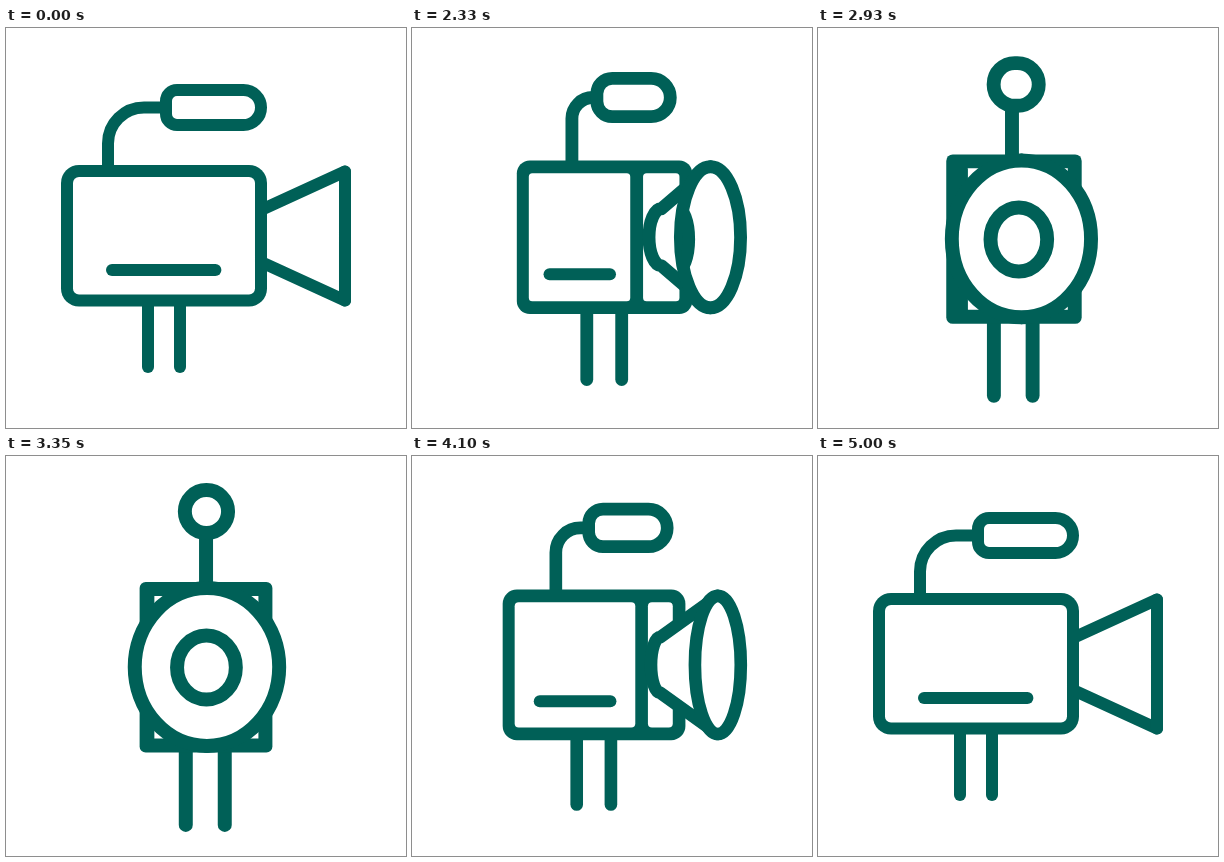
Write an HTML page with a canvas that moves like this. It is 400 by 400 pixels and loops after 5.03 s.

```html
<!DOCTYPE html>
<html lang="en">
<head>
<meta charset="utf-8">
<title>Turning camera</title>
<style>
html, body { margin: 0; width: 100%; height: 100%; overflow: hidden; background: #fff; }
canvas { display: block; width: 400px; height: 400px; }
</style>
</head>
<body>
<canvas id="stage" width="400" height="400"></canvas>
<script>
const ctx = document.getElementById('stage').getContext('2d');
const INK = '#006057', PAPER = '#fff';
const LOOP = 5030, START = 2030, STEP = 30;

const clamp = v => Math.min(1, Math.max(0, v));

// Damped approach to the front view, then a smooth return: 0 is side, 1 is front
function turn(t) {
  const y = Math.max(0, t - 2000) * .0071;
  const there = 1 - (1 + y + y * y / 2) * Math.exp(-y);
  const u = clamp((t - 3550) / 880);
  return there * (1 - u * u * (3 - 2 * u));
}

// One swing to the right with a small rebound to the left
function swing(t, begin, length) {
  const u = clamp((t - begin) / length);
  return 850 * u ** 1.5 * (1 - u) ** 2.5 * (.578 - u);
}

const sway = t => swing(t, 2000, 1400) + swing(t, 3500, 1500);

function line(x0, y0, x1, y1) {
  ctx.beginPath();
  ctx.moveTo(x0, y0);
  ctx.lineTo(x1, y1);
  ctx.stroke();
}

function box(x0, y0, x1, y1, radii) {
  ctx.beginPath();
  ctx.roundRect(x0, y0, Math.max(0, x1 - x0), y1 - y0, radii);
  ctx.fill();
}

function oval(x, y, rx, ry) {
  ctx.beginPath();
  ctx.ellipse(x, y, Math.max(rx, .01), ry, 0, 0, Math.PI * 2);
}

function draw(q, shift) {
  const mix = (side, front) => side + (front - side) * q;
  const pen = mix(12, 14), half = pen / 2;
  ctx.setTransform(1, 0, 0, 1, 0, 0);
  ctx.fillStyle = PAPER;
  ctx.fillRect(0, 0, 400, 400);
  ctx.translate(shift, 0);
  ctx.strokeStyle = INK;
  ctx.lineCap = ctx.lineJoin = 'round';
  ctx.lineWidth = pen;

  const top = mix(143, 133), bottom = mix(272.5, 289.5);
  const left = mix(61, 141), edge = mix(255, 141), right = mix(255, 259.5);

  // legs
  const foot = mix(339, 369);
  for (const x of [mix(142, 180), mix(174, 219)]) line(x, bottom, x, foot);

  // microphone and its arm
  const micL = mix(160, 179), micR = mix(255, 222);
  const micT = mix(62, 34), micB = mix(97, 77), micY = (micT + micB) / 2;
  const armX = mix(102, 200.5), bend = mix(36, 0);
  ctx.beginPath();
  ctx.moveTo(armX, top);
  ctx.arcTo(armX, micY, armX + bend, micY, bend);
  ctx.lineTo(Math.max(armX + bend, micL), micY);
  ctx.stroke();
  const back = mix(11, 21.5), nose = (micB - micT) / 2;
  box(micL, micT, micR, micB, [back, nose, nose, back]);
  ctx.stroke();

  // body: solid block with a side panel and a front panel cut out
  const round = mix(6, 0), wide = edge - left;
  ctx.fillStyle = INK;
  box(left - half, top - half, right + half, bottom + half, mix(18, 6));
  ctx.fillStyle = PAPER;
  box(left + mix(6, 5), top + half, edge - half, bottom - half, round);
  box(edge + half, top + half, right - half, bottom - half, round);
  if (wide > pen) {
    const y = top + (bottom - top) * .764;
    ctx.lineWidth = 12;
    line(left + wide * .232, y, left + wide * .765, y);
    ctx.lineWidth = pen;
  }

  // hood, from its joint on the front face to the lens
  const lensX = mix(339, 200.5), lensY = mix(208, 211);
  const lensRx = mix(0, 72.5), lensRy = mix(64.5, 79);
  const ringRx = mix(0, 29.5), ringRy = mix(26, 32);
  ctx.beginPath();
  ctx.moveTo(lensX, lensY + lensRy);
  ctx.ellipse((edge + right) / 2, lensY, Math.max(ringRx, .01), ringRy, 0, Math.PI / 2, Math.PI * 1.5);
  ctx.lineTo(lensX, lensY - lensRy);
  ctx.fill();
  ctx.stroke();
  oval(lensX, lensY, lensRx, lensRy);
  ctx.fill();
  ctx.stroke();

  // inner ring, seen only through the lens
  ctx.save();
  ctx.clip();
  oval(mix(281, 200.2), mix(211, 211.5), ringRx, 32);
  ctx.stroke();
  ctx.restore();
}

let began;
function frame(now) {
  began ??= now;
  const t = (now - began) % LOOP;
  const at = t < START ? 0 : START + Math.floor((t - START) / STEP) * STEP;
  draw(turn(at), sway(at));
  requestAnimationFrame(frame);
}

draw(0, 0);
requestAnimationFrame(frame);
</script>
</body>
</html>
```
